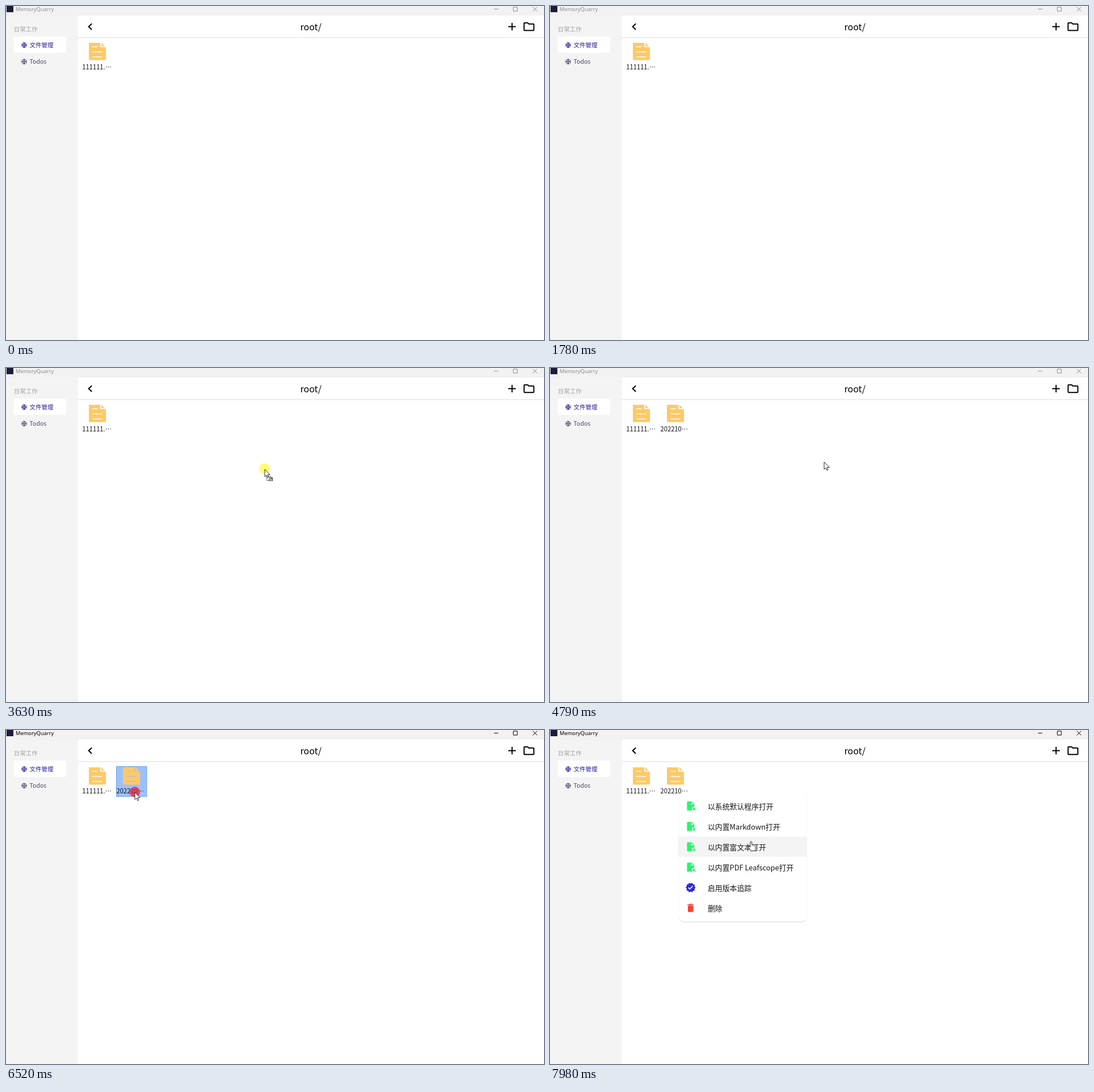
These frames come from a looping animation (948x590 px, 8000 ms). An HTML page:

```html
<!DOCTYPE html>
<html lang="zh-CN">
<head>
<meta charset="utf-8">
<title>File manager</title>
<style>
  html, body { margin: 0; width: 100%; height: 100%; overflow: hidden; background: #fff; }
  svg { display: block; width: 948px; height: 590px; }
  text { font-family: "Noto Sans CJK SC", "Noto Sans CJK JP", "Noto Sans CJK", sans-serif; white-space: pre; }
  .title { font: 9.3px "Noto Sans", "Open Sans", sans-serif; }
  .nav { font-size: 10.5px; }
  .path { font-size: 16px; font-weight: 500; fill: #000; }
  .file { font-size: 11.2px; font-weight: 500; fill: #10101c; }
  .menu { font-size: 12.85px; fill: #161616; }
  #menu { filter: drop-shadow(0 1px .7px rgba(0, 0, 0, .18)); }
</style>
</head>
<body>
<svg viewBox="0 0 948 590">
  <defs>
    <g id="flake" fill="none" stroke-width="2"></g>
    <g id="fileIcon">
      <path d="M0 0H22L30 8V30.5H0Z" fill="#fdc968"/>
      <path d="M21 0V6.6H30M6.5 7H15.5M6.5 16H23.5M6.5 25H23.5" fill="none" stroke="currentColor" stroke-width="1.7"/>
    </g>
    <path id="openFile" fill="#27f56f" d="M14 2H6c-1.1 0-2 .9-2 2v16c0 1.1.9 2 2 2h9v-8h5V8zm-1 7V3.5L18.5 9zm4 12.7V16h5.7v2h-2.3l3 3-1.4 1.4-3-3v2.3z"/>
    <path id="verified" fill="#2a2af4" d="M23 12l-2.4-2.8.3-3.7-3.6-.8-1.9-3.2L12 3 8.6 1.5 6.7 4.7l-3.6.8.3 3.7L1 12l2.4 2.8-.3 3.7 3.6.8 1.9 3.2L12 21l3.4 1.5 1.9-3.2 3.6-.8-.3-3.7zm-12.9 4.7l-3.8-3.8 1.5-1.5 2.3 2.4L16 7.9l1.4 1.5z"/>
    <path id="trash" fill="#f44336" d="M6 19c0 1.1.9 2 2 2h8c1.1 0 2-.9 2-2V7H6zM19 4h-3.5l-1-1h-5l-1 1H5v2h14z"/>
  </defs>

  <rect width="948" height="590" fill="#f4f4f4"/>
  <rect width="948" height="17" fill="#f2f2f2"/>
  <rect x="127" y="17" width="821" height="573" fill="#fff"/>
  <rect x="127" y="55" width="821" height="1" fill="#e7e7e7"/>
  <rect x="127" y="56" width="821" height="1" fill="#f3f3f3"/>

  <rect x="1" width="12" height="11" fill="#1c1c3c"/>
  <g id="caption">
    <text class="title" x="17" y="8.5" fill="currentColor">MemoryQuarry</text>
    <path d="M860 5.5H867.5M894 2H901V9H894ZM928.3 1.7L936 9.4M936 1.7L928.3 9.4" fill="none" stroke="currentColor"/>
  </g>

  <text class="nav" x="13.8" y="44.7" fill="#a2a2a2">日常工作</text>
  <rect x="13.5" y="54" width="92.5" height="29" rx="3" fill="#fff"/>
  <use href="#flake" transform="translate(32 69) scale(.52)" stroke="#201b90"/>
  <text class="nav" x="41.5" y="73" fill="#201b90">文件管理</text>
  <use href="#flake" transform="translate(32 98.3) scale(.52)" stroke="#4d4863"/>
  <text class="nav" x="41.5" y="102.4" fill="#4d4863">Todos</text>

  <path d="M151.2 31.2L145.7 36.5 151.2 41.8M885 36.4H898.4M891.7 29.7V43.1" fill="none" stroke="#000" stroke-width="2"/>
  <path transform="translate(910 25) scale(.96)" d="M9.2 6l2 2H20v10H4V6h5.2M10 4H4c-1.1 0-2 .9-2 2v12c0 1.1.9 2 2 2h16c1.1 0 2-.9 2-2V8c0-1.1-.9-2-2-2h-8z"/>
  <text class="path" x="518.5" y="43">root/</text>

  <g color="#fff">
    <use class="icon" href="#fileIcon" x="146" y="65"/>
    <text class="file" x="134.3" y="112">111111.…</text>
  </g>
  <g id="newFile">
    <rect id="selection" x="194.5" y="64.5" width="53.5" height="53" fill="#9dc0fb" stroke="#6ea5ef"/>
    <use class="icon" href="#fileIcon" x="206" y="65"/>
    <text class="file" x="194.5" y="112">202210…</text>
  </g>

  <g id="menu">
    <rect x="226.5" y="109.6" width="226" height="229" rx="9.6" fill="#fff"/>
    <rect id="hover" x="226.5" width="226" height="36" fill="#f4f4f4"/>
    <g id="items"></g>
  </g>

  <g id="pointer">
    <circle id="halo" r="9.2"/>
    <path id="arrow" d="M0 0V13L3 10.3 5 14.8 6.9 14 5 9.5H9.2Z" fill="#fff" stroke="#111" stroke-width=".9"/>
    <g id="link" fill="none" stroke="#222">
      <path d="M3.5 12V19.5H8M6 12.5H11V15" stroke-dasharray="2 1"/>
      <rect x="8" y="14.8" width="5.6" height="5.2" fill="#fff"/>
      <path d="M9.5 18.5L12 16.2M10.3 16.2H12V18"/>
    </g>
    <path id="hand" fill="#fff" stroke="#111" stroke-width=".9" d="M-1.5 1.2a1.4 1.4 0 0 1 2.8 0V6l1 .1q1.3-.4 1.8.7 1.4-.4 2 .6 1.7-.2 1.7 1.4V12q0 1.5-1 3v1.6H-1.2V15L-4.6 10.6Q-4.8 8.6-3 8.8L-1.5 10Z"/>
  </g>
</svg>
<script>
const LOOP = 8000, STEP = 78, ROW_TOP = 116, ROW = 36;
const DRAG = 3240, DROP = 4320, NUDGE = 5820, RIGHT_CLICK = 6520, MENU = 6680, HOVER = 7450;
const $ = id => document.getElementById(id);
const set = (id, attrs) => { for (const name in attrs) $(id).setAttribute(name, attrs[name]); };
const show = (id, on) => set(id, { visibility: on ? 'visible' : 'hidden' });

$('flake').innerHTML = [0, 90, 180, 270].map(angle =>
  `<path transform="rotate(${angle})" d="M0 0V-10M-5 -8.4L0 -3.4 5 -8.4"/>`).join('');

$('items').innerHTML = [
  ['openFile', '以系统默认程序打开'],
  ['openFile', '以内置Markdown打开'],
  ['openFile', '以内置富文本打开'],
  ['openFile', '以内置PDF Leafscope打开'],
  ['verified', '启用版本追踪'],
  ['trash', '删除'],
].map(([icon, label], i) => {
  const y = ROW_TOP + ROW * (i + .5);
  return `<use href="#${icon}" transform="translate(238.2 ${y - 9.3}) scale(.8)"/>
    <text class="menu" x="278" y="${y + 5.6}">${label}</text>`;
}).join('');

// Each move goes on from the last one; sway bends it with `waves` half sine waves.
const entry = { x: 944, y: 599 };
const moves = [
  { at: 130, steps: 7, x: 728, y: 297 },
  { at: 750, steps: 9, x: 744, y: 268, sway: [-38, 0], waves: 2 },
  { at: 1540, steps: 4, x: 980, y: 206 },
  { at: DRAG, steps: 4, x: 456, y: 179, sway: [-54, 28] },
  { at: DROP, steps: 2, x: 463, y: 173 },
  { at: 4630, steps: 3, x: 483, y: 166, sway: [4, -3] },
  { at: 5030, steps: 3, x: 413, y: 184 },
  { at: 5340, steps: 9, x: 227, y: 110, sway: [0, 15], ease: 3 },
  { at: HOVER, steps: 8, x: 331, y: 206, sway: [95, 8] },
];

function pointerAt(t) {
  const index = moves.findLastIndex(move => move.at <= t);
  if (index < 0) return entry;
  const from = moves[index - 1] || entry;
  const { at, steps, x, y, sway = [0, 0], waves = 1, ease = 1 } = moves[index];
  const u = Math.min(1, (Math.floor((t - at + 8) / STEP) + 1) / steps);
  const eased = 1 - (1 - u) ** ease;
  const bend = Math.sin(waves * Math.PI * u);
  return {
    x: from.x + (x - from.x) * eased + sway[0] * bend,
    y: from.y + (y - from.y) * eased + sway[1] * bend,
  };
}

function draw(t) {
  const { x, y } = pointerAt(t);
  const dragging = t >= DRAG && t < DROP;
  const clicked = t >= RIGHT_CLICK && t < MENU;
  const hovering = t >= HOVER;

  set('caption', { color: t >= RIGHT_CLICK ? '#000' : '#8c8c8c' });
  show('newFile', t >= DROP);
  set('newFile', { color: clicked ? '#bcc2c6' : '#fff' });
  set('selection', { opacity: +clicked });
  for (const icon of document.querySelectorAll('.icon')) icon.setAttribute('y', t >= NUDGE ? 66 : 65);

  show('menu', t >= MENU);
  set('menu', { opacity: t < MENU + STEP ? .6 : 1 });
  set('hover', { opacity: +hovering, y: ROW_TOP + ROW * Math.floor((y - ROW_TOP) / ROW) });

  set('pointer', { transform: `translate(${x} ${y})` });
  show('arrow', !hovering);
  show('hand', hovering);
  show('link', dragging);
  show('halo', dragging || clicked);
  set('halo', dragging
    ? { transform: 'translate(-.8 -1.6)', fill: '#ffff70' }
    : { transform: 'translate(0 -.5)', fill: 'rgba(222, 48, 72, .82)' });
}

const origin = performance.now();
function tick() {
  draw((performance.now() - origin) % LOOP);
  requestAnimationFrame(tick);
}
tick();
</script>
</body>
</html>
```
